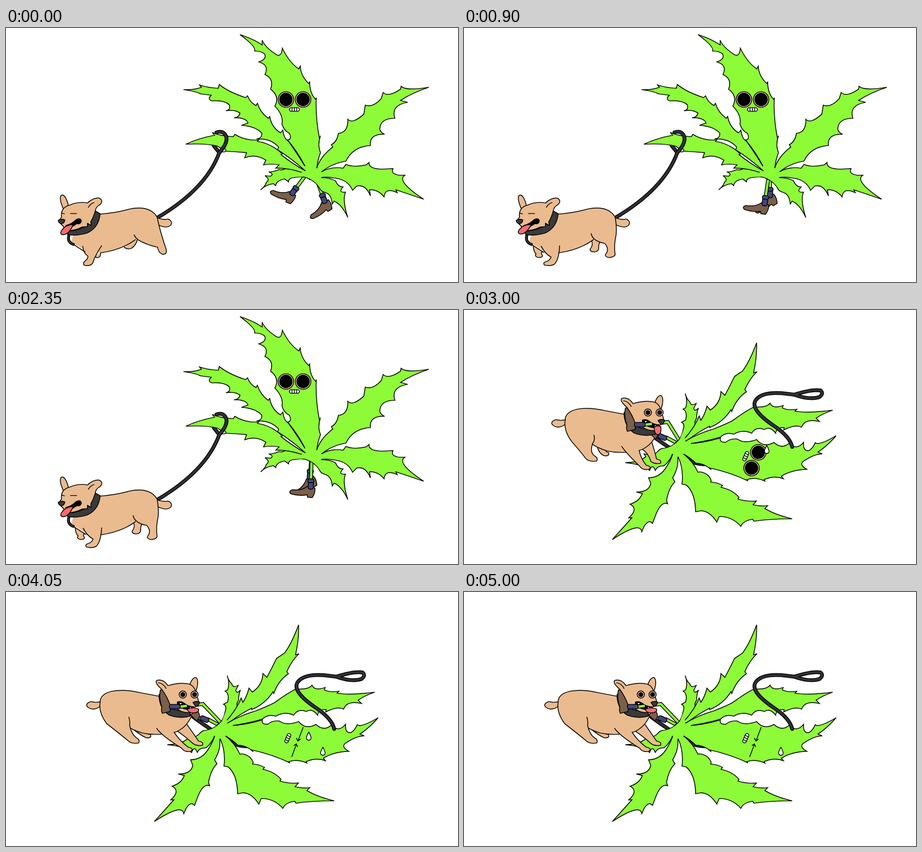
An HTML page for the animation above (5.05 s loop, 960 px wide and 540 px high).

```html
<!DOCTYPE html>
<html lang="en">
<head>
<meta charset="utf-8">
<title>Dog walk</title>
<style>
html, body { margin: 0; width: 100%; height: 100%; overflow: hidden; background: #fff; }
svg { display: block; width: 960px; height: 540px; }
path, circle, ellipse, rect { stroke: #000; stroke-width: 1.7; }
.leaf path { fill: #8dfb37; stroke-linejoin: miter; }
.fur path, path.fur { fill: #eabb8e; stroke-linejoin: round; stroke-linecap: round; }
.line path, path.line { fill: none; stroke-linecap: round; }
.bare, .leaf .bare { stroke: none; }
.dark { fill: #3a3a3b; }
.shoe { fill: #7a604a; stroke-linejoin: round; }
.sock { fill: #41477b; }
.tongue { fill: #fb6b70; }
.white { fill: #fff; }
.skin { fill: #f5cac3; }
.rope path { fill: none; stroke-linecap: round; stroke-linejoin: round; }
.rope .edge { stroke-width: 8; }
.rope .core { stroke: #303033; stroke-width: 4.8; }
.limb .edge { fill: none; stroke-width: 8; }
.limb .core { fill: none; stroke: #8dfb37; stroke-width: 4.8; }
</style>
</head>
<body>
<svg viewBox="0 0 960 540">
<defs>
  <g id="leaf" class="leaf">
    <path d="M634 309Q606 297 594 298Q588 303 580 301Q568 306 558 306Q570 310 562 315L550 314Q562 322 553 328Q551 336 541 344Q552 333 568 331L573 335Q574 324 592 321L600 327Q600 319 612 318Q636 313 646 323"/>
    <path d="M636 304Q606 287 584 269L587 268Q565 246 534 241L537 238Q508 240 486 226L483 231Q455 230 438 222L443 228Q410 234 382 247Q425 245 449 251L466 262Q490 263 511 265L507 276Q530 267 552 281L547 291Q565 288 580 291L573 298Q600 297 634 309"/>
    <path d="M635 294Q620 264 598 238Q608 237 602 224Q590 218 586 204Q590 186 571 166Q582 145 562 130Q570 108 550 99Q560 79 537 72Q555 66 549 55Q542 49 528 49Q532 40 497 14Q525 23 544 36L544 26Q551 42 575 57Q585 62 587 43Q602 74 622 87L625 81Q626 102 643 118L645 115Q645 139 658 152L659 148Q657 190 666 236L668 229Q661 248 668 265Q662 280 660 298"/>
    <path d="M670 306Q690 294 716 298L722 290Q738 297 765 291L771 286Q770 300 800 300L822 299Q816 310 835 313L847 313Q828 325 887 364Q858 354 828 344L831 350Q805 338 803 359Q790 343 772 344L774 357Q764 332 745 336L736 345Q726 322 698 319Q682 316 668 318"/>
    <path d="M668 318Q688 318 700 325Q705 338 716 338Q704 350 721 349Q714 366 726 403Q714 376 697 368L693 374Q691 354 679 350Q670 347 668 344Q660 328 643 320"/>
    <path class="bare" d="M634 293L661 297L672 305L669 319L668 342Q656 322 634 316L608 317L632 305Z"/>
  </g>
  <g id="eyes">
    <circle class="skin" cx="594.500" cy="152" r="16.500"/><circle cx="594.500" cy="152" r="13.300"/>
    <circle class="skin" cx="631" cy="152" r="16.500"/><circle cx="631" cy="152" r="13.300"/>
  </g>
  <g id="mouth">
    <rect class="white" x="602" y="169.500" width="21" height="7.500" rx="3.700"/>
    <path d="M607.500 170V177M612.500 170V177M617.500 170V177"/>
  </g>
  <g id="foot">
    <path class="shoe" d="M-7 -2L9 -1Q12 8 7 20L-3 21L-5 16Q-20 22 -39 20Q-46 16 -38 11Q-18 10 -7 -2Z"/>
  </g>
  <path id="drop" class="white" d="M0 -9Q7 3 4 6Q0 10 -4 6Q-7 3 0 -9Z"/>
</defs>

<g id="walk">
  <g id="far"></g>
  <g id="near"></g>
  <g class="rope"><path class="edge" d="M441 250L453 265"/><path class="core" d="M441 250L453 265"/></g>
  <use href="#leaf"/>
  <g class="leaf">
    <path d="M635 294Q618 266 600 241Q590 235 588 217L583 223Q564 211 560 188L557 192Q540 180 534 160L531 165Q518 158 513 144L509 148Q472 136 453 120L451 128Q428 127 411 121L415 126Q400 132 377 131Q405 135 413 140L436 143Q427 151 437 155Q463 153 474 163Q478 174 467 176Q487 173 497 181Q495 190 484 191Q510 190 514 202L500 207Q528 208 543 223Q545 234 532 236Q562 234 579 253L577 259Q606 277 636 304"/>
    <path d="M660 298Q667 274 694 253L691 248Q703 242 706 224Q727 222 726 194Q736 205 760 183L763 164Q779 170 797 150L801 137Q812 148 838 130L839 124Q850 134 898 126Q862 138 838 154L853 158Q817 164 826 192Q796 192 794 213Q793 221 804 226Q771 225 774 250Q737 252 722 283Q692 288 670 306"/>
  </g>
  <use href="#eyes"/><use href="#mouth"/>
  <ellipse class="white" cx="462" cy="260" rx="5" ry="3.500"/>
  <g class="rope">
    <path class="edge" d="M447 222Q461 217 467 229Q473 243 453 265Q425 342 322 403"/>
    <path class="core" d="M447 222Q461 217 467 229Q473 243 453 265Q425 342 322 403"/>
  </g>
  <g class="fur">
    <path d="M317 402Q335 409 344 406Q355 411 350 419Q342 427 324 419"/>
    <g id="farSpread">
      <path d="M251 466Q258 472 267 468Q277 461 279 449"/>
      <path d="M189 485Q194 492 200 485L201 477"/>
    </g>
    <g id="farStand">
      <path d="M270 451Q276 460 268 470Q267 476 277 476Q287 475 286 466Q286 458 291 451"/>
      <path d="M147 463Q148 476 153 480Q149 487 160 488Q170 487 165 481Q163 474 170 477"/>
    </g>
    <path class="bare" d="M185 395Q235 393 262 385Q305 376 321 402L318 440L276 449Q245 472 203 478L165 471L138 455L150 420Z"/>
    <g id="nearSpread">
      <path d="M321 402Q327 432 340 470Q343 482 332 481Q323 477 322 466Q298 461 280 450Q275 446 272 440"/>
      <path d="M163 464Q165 480 174 485Q174 492 166 497Q162 504 169 505Q180 506 184 500Q190 482 203 463"/>
    </g>
    <g id="nearStand">
      <path d="M321 402Q325 425 323 440Q318 462 321 482Q318 488 307 488Q296 485 303 478Q308 468 299 458Q273 453 270 437"/>
      <path d="M164 464Q172 480 185 487Q182 495 173 497Q167 500 171 504Q184 507 192 502Q202 492 203 463"/>
    </g>
    <g class="line">
      <path d="M198 396Q235 393 262 385Q305 376 321 402"/>
      <path d="M201 478Q245 472 275 450M140 458Q152 466 168 476"/>
    </g>
  </g>
  <g class="rope">
    <path class="edge" style="stroke-width:6" d="M134 439Q129 455 143 460"/>
    <path class="core" style="stroke-width:3" d="M134 439Q129 455 143 460"/>
  </g>
  <path class="dark" d="M190 389L200 395Q197 425 172 436Q148 443 131 439L129 432Q160 430 177 416Z"/>
  <g class="fur">
    <path d="M122 385Q112 362 117 356Q126 351 133 379"/>
    <path d="M129 431Q122 421 115 415Q112 408 118 402Q116 392 122 384Q128 378 134 377Q154 368 173 372Q188 359 199 362Q208 368 199 376Q191 379 189 391Q185 404 180 412L181 420L173 415L173 422L162 423Q147 431 129 431Z"/>
    <path class="line" d="M175 381Q180 373 187 371M137 394.500H150M118 393.500L124 395"/>
  </g>
  <path d="M127 420Q141 416 148 408Q158 402 160 410Q159 418 150 416Q140 424 130 425Z"/>
  <path id="tongue" class="tongue" d="M143 418Q127 417 118 428Q111 437 121 438Q132 438 143 418Z"/>
  <path class="dark" d="M111 409Q117 405 125 408Q124 416 117 416Q111 414 111 409Z"/>
</g>

<g id="tug">
  <g class="rope">
    <path class="edge" d="M398 266Q436 294 470 314Q484 327 512 328"/>
    <path class="core" d="M398 266Q436 294 470 314Q484 327 512 328"/>
  </g>
  <g class="limb">
    <path class="edge" d="M458 286L428 270"/><path class="core" d="M458 286L428 270"/>
    <path id="legEdge" class="edge"/><path id="legCore" class="core"/>
  </g>
  <g transform="translate(468 293.500) rotate(113.200) translate(-648 -300)">
    <use href="#leaf"/><use id="open" href="#eyes"/><use href="#mouth"/>
  </g>
  <g class="leaf">
    <path d="M470 279Q498 262 530 253Q565 239 572 234Q598 215 616 206Q643 208 650 198Q655 211 678 203L676 208Q687 214 707 211L703 215Q730 220 783 213Q760 221 748 230L755 237Q724 230 717 249Q704 242 679 255L680 250Q663 249 662 262Q650 246 638 254Q620 247 611 262Q592 253 573 264Q556 259 545 270Q520 278 480 284"/>
    <path d="M465 305Q486 321 497 345L500 344Q519 346 525 362L524 366Q537 366 549 373L546 377Q570 382 584 398L582 402Q602 408 621 406L614 414Q630 418 645 416L639 422Q660 435 697 444Q650 444 616 449L613 445Q594 447 588 460Q570 439 542 439L537 451Q521 426 502 427L492 429Q491 388 472 372L463 370Q467 338 454 310"/>
    <path class="bare" d="M462 278L482 283L480 302L466 306L454 312L446 300Z"/>
  </g>
  <path id="squint" class="line" d="M631 288L620 317M617 311L620 317L625 313M607 350L617 323M612 326L617 323L619 329"/>
  <use id="dropA" href="#drop"/><use id="dropB" href="#drop"/>
  <g class="rope">
    <path class="edge" d="M697 291Q692 268 655 244Q606 210 620 191Q635 172 685 178L701 180Q740 168 757 171Q765 177 755 185Q735 192 701 180"/>
    <path class="core" d="M697 291Q692 268 655 244Q606 210 620 191Q635 172 685 178L701 180Q740 168 757 171Q765 177 755 185Q735 192 701 180"/>
  </g>
  <path id="farFront" class="fur"/>
  <path id="farHind" class="fur"/>
  <g id="torso" class="fur">
    <path d="M217 233Q205 236 196 233Q184 236 187 243Q194 251 206 248Q214 245 218 240"/>
    <path d="M215 235Q214 217 240 211Q265 206 300 214L342 222L410 262Q398 290 372 299Q335 306 305 300Q285 294 272 285"/>
  </g>
  <path id="hind" class="fur"/>
  <path id="front" class="fur"/>
  <path class="shoe" id="shoe2" d="M394 262L404 249Q412 254 413 265L407 274Z"/>
  <rect class="sock" x="412" y="265" width="19" height="10" rx="4" transform="rotate(24 421 270)"/>
  <g id="head">
    <path class="dark" d="M340 218L348 214Q352 245 380 252L407 254L406 264Q385 270 362 262Q340 248 340 218Z"/>
    <path class="shoe" d="M343 208Q351 208 355 220Q361 231 366 241L363 254L347 258Q344 252 346 244Q339 225 343 208Z"/>
    <g class="fur">
      <path d="M404 200Q411 180 419 182Q426 190 418 212"/>
      <path d="M346 207Q330 193 335 188Q349 184 359 199Q386 191 405 196Q417 201 420 220Q426 233 423 240Q418 246 407 246Q413 251 410 256Q394 258 382 251L364 241Q357 222 346 207Z"/>
      <path class="line" d="M339 193Q349 194 355 205"/>
    </g>
    <path d="M379 234Q387 231 394 237Q403 244 414 244L409 251Q390 250 379 240Z"/>
    <path class="white" d="M383 236L386 240L389 236M404 248L407 243L409 248" style="stroke-width:.8"/>
    <path id="bite" class="tongue"/>
    <g class="limb"><path class="edge" d="M384 244L398 242"/><path class="core" d="M384 244L399 242"/></g>
    <rect class="sock" x="362" y="239" width="23" height="9.500" rx="4"/>
    <path class="dark" d="M412 235Q419 231 426 234Q425 243 418 243Z"/>
    <circle class="skin" cx="390.500" cy="218" r="7.600"/><circle cx="390.500" cy="218" r="4.300"/>
    <circle class="skin" cx="415.500" cy="218" r="7.600"/><circle cx="415.500" cy="218" r="4.300"/>
  </g>
</g>
</svg>
<script>
const LOOP = 5050, CUT = 3000, STOP = 5000 / 3, STRIDE = 2000 / 3, STEP = 255, PULL = 237.5;
const el = {};
document.querySelectorAll('[id]').forEach(n => el[n.id] = n);
const show = (id, on) => el[id].style.display = on ? '' : 'none';
const move = (id, value) => el[id].setAttribute('transform', value);
const draw = (id, d) => el[id].setAttribute('d', d);

function leg(id, angle, length, tilt) {
  const line = `d="M0 10V${length}"`;
  el[id].innerHTML = `<g transform="translate(650 295) rotate(${angle})">
    <g class="limb"><path class="edge" ${line}/><path class="core" ${line}/></g>
    <g transform="translate(0 ${length + 9}) rotate(${tilt - angle})"><use href="#foot"/></g>
    <rect class="sock" x="-5.5" y="${length - 9}" width="11" height="21" rx="4"/>
    <rect class="sock" x="-6.5" y="${length - 10}" width="13" height="8" rx="3.500"/></g>`;
}

function walk(t) {
  const u = Math.min(t, STOP) / STRIDE % 1;
  const spread = Math.pow(Math.max(0, 1 - 2 * Math.min(u, 1 - u)), 1.4);
  leg('near', 2 + 35 * spread, 74 - 11 * spread, 10 + 17 * spread);
  leg('far', 4.5 - 24.5 * spread, 54 + 17 * spread ** 4, -27);

  const stand = t >= STOP || Math.floor(t / STEP) % 2 === 1;
  for (const part of ['far', 'near']) {
    show(part + 'Stand', stand);
    show(part + 'Spread', !stand);
  }
  const pant = Math.floor(t * 6 / 1000 + 1e-6) % 2;
  move('tongue', pant ? '' : 'rotate(-4 142 418)');
}

function tug(t) {
  const k = Math.min(1, (1 - Math.cos(2 * Math.PI * t / PULL)) * 0.55);
  const x = -15 * k;
  const at = n => n + x;
  move('torso', `translate(${x} 0)`);
  move('head', `translate(${x} 0)`);
  move('shoe2', `translate(${x * 0.1} 0)`);
  draw('hind', `M${at(215)} 234Q${at(211)} 256 ${at(229)} 280Q${246 + x / 2} 299 258 315Q266 324 282 321Q285 314 277 310Q267 303 ${273 + x * 0.7} 284Q${at(279)} 276 ${at(276)} 266`);
  draw('farHind', `M${at(283)} 290Q286 305 298 310Q310 311 307 303Q300 302 ${at(301)} 296`);
  draw('front', `M${at(335)} 290Q${at(346)} 306 373 332Q379 341 392 339Q401 333 387 330Q${375 + x / 2} 315 ${at(372)} 298`);
  draw('farFront', `M${at(376)} 294Q${at(392)} 304 397 322Q405 328 417 326Q421 319 409 317Q${405 + x / 2} 300 ${at(399)} 281`);
  const knee = `M460 282L${at(433)} 238L${at(396)} 243`;
  draw('legEdge', knee);
  draw('legCore', knee);
  const tip = 265 - 8 * k;
  draw('bite', `M${404 - 4 * k} 249Q${411 + 4 * k} 244 ${418 + 6 * k} ${248 + k}Q${420 + 6 * k} ${tip} ${411 + k} ${tip}Q${404 - 3 * k} ${tip - 1} ${404 - 4 * k} 249Z`);

  const shut = t >= 100;
  show('open', !shut);
  show('squint', shut);
  const a = t / 800 % 1, b = (t / 475 + 0.3) % 1;
  show('dropA', a < 0.45);
  move('dropA', `translate(643 ${297 + 32 * a})`);
  show('dropB', b > 0.4 && b < 0.75);
  move('dropB', `translate(673 ${334 + 10 * b})`);
}

const start = performance.now();
function frame() {
  const t = (performance.now() - start) % LOOP;
  const walking = t < CUT;
  show('walk', walking);
  show('tug', !walking);
  walking ? walk(t) : tug(t - CUT);
  requestAnimationFrame(frame);
}
frame();
</script>
</body>
</html>
```
